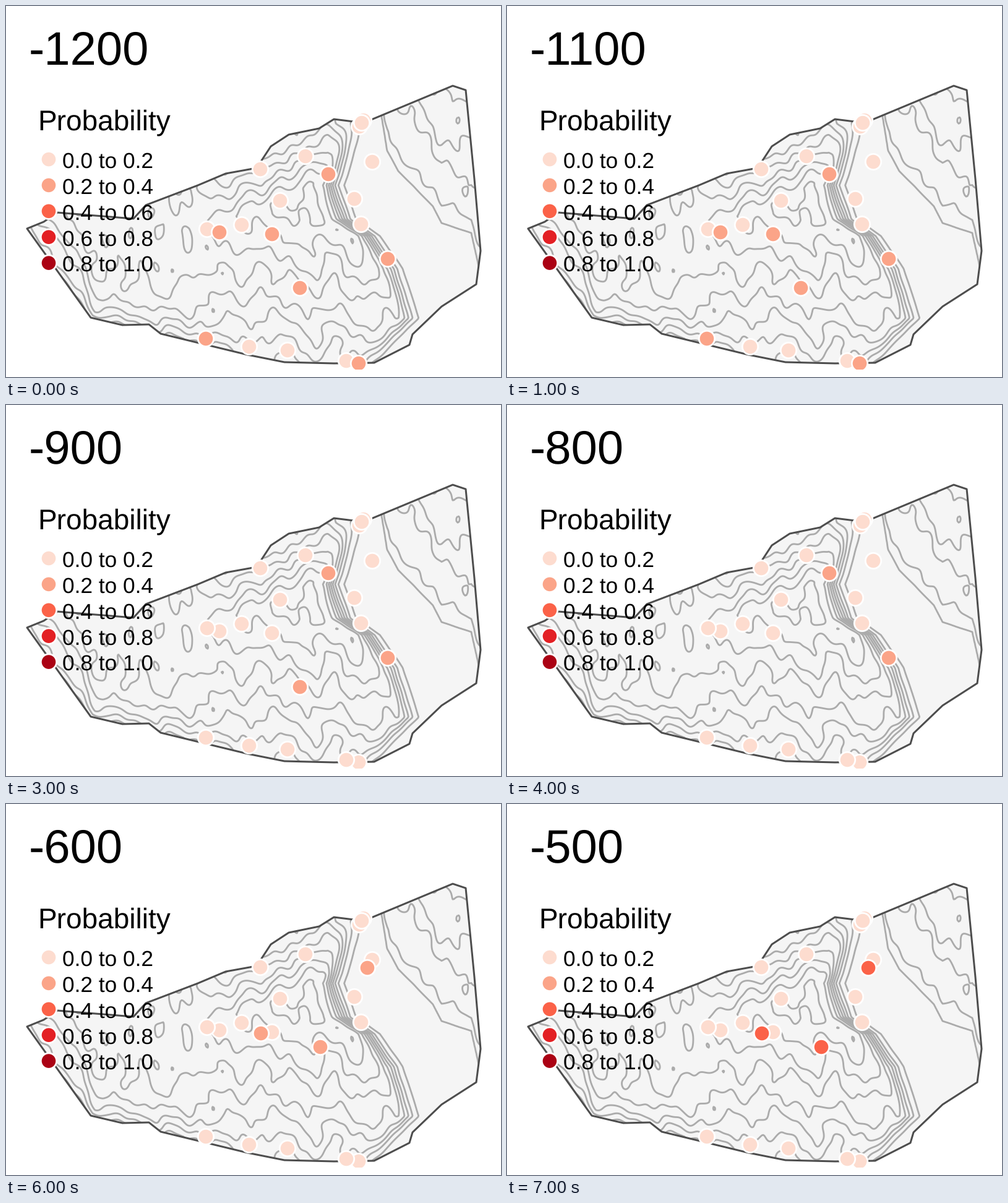
A matplotlib script that plays this animation: 800x600 px, repeating every 8000 ms.

```python
import numpy as np
import matplotlib.pyplot as plt
from matplotlib.animation import FuncAnimation
from matplotlib.patches import Polygon, Rectangle

W, H, DPI = 800, 600, 100
PX = 72 / DPI
REDS = ["#FDDCCF", "#FBA488", "#FB6248", "#E32024", "#AB0214"]
BORDER = [(34, 360), (61, 349), (83, 334), (206, 344), (226, 322), (310, 290),
          (355, 271), (405, 262), (428, 227), (457, 208), (506, 198),
          (530, 183), (578, 189), (722, 129), (743, 136), (757, 280),
          (767, 396), (760, 450), (704, 486), (657, 531), (652, 548),
          (595, 577), (530, 578), (450, 576), (390, 564), (250, 530),
          (231, 515), (188, 516), (137, 504)]

plt.rcParams["text.hinting"] = "none"
fig = plt.figure(figsize=(W / DPI, H / DPI), dpi=DPI, facecolor="white")
ax = fig.add_axes([0, 0, 1, 1])
ax.set_xlim(0, W)
ax.set_ylim(H, 0)
ax.axis("off")


def step_up(d, width):
    """Soft step from 0 to 1 around d = 0."""
    return 1 / (1 + np.exp(-np.clip(d / width, -40, 40)))


def ripples(x, y):
    """Seeded waves, mostly running east-west, with unit spread."""
    rng = np.random.default_rng(7)
    total = np.zeros_like(x)
    for wave in np.geomspace(110, 24, 40):
        angle, phase = rng.normal(0, .5), rng.uniform(0, 2 * np.pi)
        run = x * np.cos(angle) + y * np.sin(angle)
        total += wave ** .6 * np.sin(2 * np.pi * run / wave + phase)
    return total / total.std()


def terrain(x, y):
    """Height in contour steps: western upland, flat valley, north-east rise."""
    rough = .33 * ripples(x, y)

    # Upland: falls to the southern and northern borders, flat in the west
    south = 504 + .23 * (x - 137) - y
    edge = np.minimum(south, ((x - 34) * 144 - (y - 360) * 103) / 177)
    north = y - np.maximum(271 - .49 * (x - 355), 190)
    basin = 1.6 + 4.7 * (1 - np.exp(-np.maximum(edge, 0) / 35))
    slopes = np.minimum(1.6 + 7 * np.clip(south / 235, 0, 1),
                        3 + 5.6 * np.clip(north / 85, 0, 1))
    mid = step_up(x - 330, 30)
    upland = basin * (1 - mid) + slopes * mid

    # Steep scarp on the upland's east side
    scarp = np.interp(y, [180, 205, 290, 345, 372, 425, 505, 580],
                      [565, 557, 526, 545, 584, 622, 651, 580])
    west = step_up(scarp - x, 8)

    # Rise beyond the valley
    foot = np.interp(x, [604, 616, 634, 690, 704, 752, 768],
                     [160, 235, 268, 325, 352, 368, 440])
    inside = foot - y
    rise = (1.1 * step_up(inside, 8) + np.maximum(inside, 0) / 60
            + rough * np.clip(inside / 40, 0, 1))
    return .4 + west * (upland + rough) + rise * (x > 600)


land = Polygon(BORDER, facecolor="#F5F5F5", edgecolor="none", zorder=1)
ax.add_patch(land)
gx, gy = np.meshgrid(np.arange(20, 780, 2.0), np.arange(120, 590, 2.0))
lines = ax.contour(gx, gy, terrain(gx, gy), levels=np.arange(1, 11),
                   colors="#ABABAB", linewidths=2.8 * PX, zorder=2)
lines.set_clip_path(land)
ax.add_patch(Polygon(BORDER, fill=False, edgecolor="#4D4D4D", lw=3 * PX,
                     joinstyle="round", zorder=3))

# Sites, grouped by how their probability changes
FADING = [(570, 578), (345, 366), (430, 369), (323, 538)]
STEADY = [(578, 185), (571, 195), (575, 189), (592, 252), (484, 243),
          (411, 264), (443, 315), (563, 312), (574, 353), (381, 354),
          (325, 361), (393, 551), (455, 557), (550, 574)]
ENDING = [(475, 456)]
EARLY = [(521, 272), (617, 409)]
LATE = [(584, 265), (412, 371), (508, 393)]


def sites(step):
    """Visible sites with their class, the higher classes on top."""
    groups = [(FADING, 1 if step < 2 else 0), (STEADY, 0)]
    if step < 4:
        groups.append((ENDING, 1))
    groups.append((EARLY, 1) if step < 6 else (LATE, step - 5))
    found = [(p, level) for group, level in groups for p in group]
    return sorted(found, key=lambda f: f[1])


def dots(pts, colors, z):
    return ax.scatter(*np.transpose(pts), s=(25.4 * PX) ** 2, c=colors,
                      edgecolors="white", linewidths=2.8 * PX, zorder=z)


def label(x, y, text, size):
    return ax.text(x, y, text, fontsize=size * PX, family="Liberation Sans",
                   color="black", va="baseline", zorder=6)


marks = dots([(0, 0)], ["w"], 4)
marks.set_clip_path(Rectangle((0, 0), W, 588, transform=ax.transData))
year = label(36.2, 94, "", 76)
label(50.8, 200, "Probability", 46)
rows = 248 + 41.9 * np.arange(5)
dots([(69, y) for y in rows], REDS, 5)
for i, y in enumerate(rows):
    label(91, y + 13.5, f"{i / 5:.1f} to {(i + 1) / 5:.1f}", 35.2)


def update(step):
    shown = sites(step)
    marks.set_offsets([p for p, _ in shown])
    marks.set_facecolor([REDS[level] for _, level in shown])
    year.set_text(str(100 * step - 1200))
    return marks, year


anim = FuncAnimation(fig, update, frames=8, interval=1000, repeat=True)
plt.show()
```
